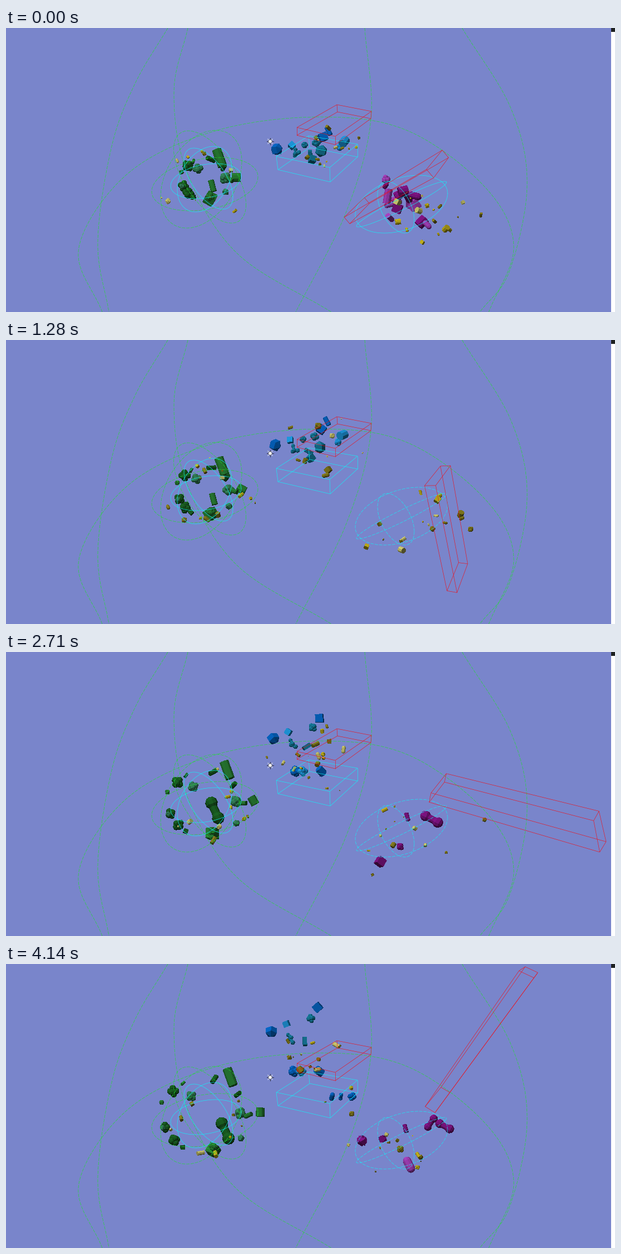
A matplotlib script for the animation above (4190 ms loop, 1095 px wide and 511 px high).

```python
import numpy as np
import matplotlib.pyplot as plt
from matplotlib.animation import FuncAnimation
from matplotlib.collections import LineCollection, PolyCollection
from matplotlib.patches import Circle, Rectangle

W, H, DPI = 1095, 511, 64
PX = 72 / DPI
LOOP, FRAMES = 4190, 88
STEP = LOOP / FRAMES
GREEN, CYAN, RED = "#1fe02f", "#10f2fa", "#ea1420"

COLORS = {
    "green": (36, 112, 46), "dark": (24, 88, 32), "sea": (48, 120, 82),
    "blue": (4, 92, 178), "cyan": (28, 140, 205), "teal": (20, 112, 142),
    "plum": (116, 18, 120), "violet": (150, 58, 170),
    "gold": (176, 160, 26), "olive": (122, 114, 28), "pale": (184, 180, 100),
}
GREENS, BLUES = ["green", "dark", "sea"], ["blue", "cyan", "teal"]
PURPLES, YELLOWS = ["plum", "plum", "violet"], ["gold", "olive", "olive", "pale"]
rng = np.random.default_rng(23)


def ease(u):
    u = np.clip(u, 0, 1)
    return u * u * (3 - 2 * u)


# ---- solids: quads of shape (faces, 4, 3) ----

def lathe(profile, n):
    r, z = np.array(profile, float).T
    a = np.arange(n + 1) * 2 * np.pi / n
    p = np.stack([np.outer(r, np.cos(a)), np.outer(r, np.sin(a)),
                  np.outer(z, np.ones(n + 1))], -1)
    q = np.stack([p[:-1, :-1], p[1:, :-1], p[1:, 1:], p[:-1, 1:]], 2)
    return q.reshape(-1, 4, 3)


def cylinder(r, h, n=10):
    return lathe([(0, -h), (r, -h), (r, h), (0, h)], n)


def arc(r, z, a0, a1, n):
    a = np.radians(np.linspace(a0, a1, n))
    return [(r * np.cos(x), z + r * np.sin(x)) for x in a]


ball = lathe(arc(1, 0, -90, 90, 6), 8)
octa = lathe([(0, -1), (1, 0), (0, 1)], 4)
SOLIDS = {
    "box": cylinder(.95, .65, 4),
    "slab": cylinder(.6, 1, 4),
    "rod": cylinder(.5, 1),
    "drum": cylinder(.75, .75),
    "ico": lathe([(0, -1), (.9, -.45), (.9, .45), (0, 1)], 5),
    "pill": lathe(arc(.48, -.52, -90, 0, 4) + arc(.48, .52, 0, 90, 4), 10),
    "bone": lathe(arc(.42, -.58, -90, 50, 5) + arc(.42, .58, -50, 90, 5), 10),
    "knot": np.concatenate([ball * .5 + s * .5 * d for d in np.eye(3) for s in (-1, 1)]),
    "star": np.concatenate([octa, octa[:, :, [1, 2, 0]] * .75 + .15, cylinder(.8, .6, 4)]),
}
ROUND = ["knot", "drum", "knot", "ico", "rod", "box"]
LIGHT = np.array([-.35, -.65, .68])
bodies = []


def add(path, r, colors, kinds=ROUND, born=-500, gone=LOOP + 500, aim=None):
    """A tumbling solid; path gives its place at a time in ms."""
    bodies.append(dict(
        path=path, r=r, born=born, gone=gone,
        quads=SOLIDS[rng.choice(kinds)],
        color=np.array(COLORS[rng.choice(colors)]) / 255,
        aim=rng.uniform(0, 6.3) if aim is None else np.radians(aim),
        turn=rng.uniform(-.8, .8) if aim is None else 0,
        pitch=rng.uniform(-.9, .9) if aim is None else .2,
        spin=rng.uniform(0, 6.3), rate=rng.uniform(-1.4, 1.4)))


def pose(b, t):
    s = t / 1000
    a, p, c = b["aim"] + b["turn"] * s, b["pitch"], b["spin"] + b["rate"] * s
    d = np.array([np.cos(p) * np.cos(a), np.cos(p) * np.sin(a), np.sin(p)])
    u = np.array([np.sin(a), -np.cos(a), 0])
    v = np.cross(d, u)
    return np.array([u * np.cos(c) + v * np.sin(c),
                     v * np.cos(c) - u * np.sin(c), d])


def shade(b, t):
    size = b["r"] * np.clip(min(t - b["born"], b["gone"] - t) / 150, 0, 1)
    if size < .3:
        return None
    q = b["quads"] @ pose(b, t)
    n = np.cross(q[:, 3] - q[:, 1], q[:, 2] - q[:, 0])
    n /= np.linalg.norm(n, axis=1, keepdims=True) + 1e-9
    order = np.argsort(q[:, :, 2].mean(1))
    order = order[n[order, 2] > 0]
    lit = .42 + .72 * np.clip(n[order] @ LIGHT, 0, 1)
    return (q[order, :, :2] * size + b["path"](t),
            np.clip(lit[:, None] * b["color"], 0, 1))


def slide(a, b, t0=0, t1=LOOP):
    """Straight, even motion from a to b."""
    a, b = np.array(a, float), np.array(b, float)
    return lambda t: a + (b - a) * (t - t0) / (t1 - t0)


# ---- green swarm: spreads out from its centre ----
def spread(x, y):
    mid = np.array([360, 272])
    return lambda t: mid + (np.array([x, y]) - mid) * (1 + .8 * ease(t / LOOP))


for x, y in [(327, 248), (345, 253), (319, 284), (328, 297), (394, 270), (414, 269)]:
    add(spread(x, y), rng.uniform(9, 12), GREENS, ["knot", "drum"])
add(spread(384, 234), 16, ["green"], ["rod"], aim=70)
add(spread(367, 307), 13, ["green"], ["box"])
add(spread(371, 284), 10, ["green"], ["rod"], aim=75, gone=2400)
add(slide((373, 283), (395, 301), 2500), 26, ["dark"], ["bone"], born=2400, aim=66)
for a in np.arange(9) * 2 * np.pi / 9:
    d = rng.uniform(.8, 1.05)
    add(spread(360 + 48 * d * np.cos(a), 272 + 38 * d * np.sin(a)),
        rng.uniform(4, 8), GREENS)


# ---- blue swarm: floats up, the higher the faster ----
def rise(x, y):
    return slide((x, y), (x - 10, y - (318 - y)))


add(rise(487, 219), 11, ["blue"], ["ico"])
add(rise(514, 212), 7, ["cyan"], ["box"])
add(rise(570, 197), 10, ["blue"], ["box"])
for x, y in [(523, 227), (547, 228), (520, 223), (558, 207)]:
    add(rise(x, y), rng.uniform(7, 9), ["teal", "blue"], ["slab", "knot", "bone"])
for x, y in [(537, 211), (567, 222), (551, 237), (580, 186), (600, 215), (608, 205)]:
    add(rise(x, y), rng.uniform(5, 11), BLUES, gone=rng.uniform(1700, 2400))
for x in (527, 540, 573):
    add(rise(x, 255), rng.uniform(8, 11), BLUES, born=rng.uniform(1700, 2400))
for x in (596, 612, 632):
    add(rise(x, 278), 8, ["blue"], ["bone", "pill", "knot"], born=3500)

# ---- purple swarm: swept away, then a second, slow one ----
for i in range(14):
    x, y = 705 + rng.normal(0, 22), 314 + rng.normal(0, 16)
    add(slide((x, y), (x + 10, y + 12), 0, 600), rng.uniform(7, 13), PURPLES,
        ROUND + ["pill", "rod"], gone=rng.uniform(450, 1050))
add(slide((757, 354), (763, 357), 0, 650), 9, ["violet"], ["pill"], gone=1000, aim=45)
add(slide((735, 302), (739, 304), 0, 650), 12, ["plum"], ["pill"], gone=1000, aim=15)
add(slide((780, 296), (765, 301), 2040, 2710), 22, ["plum"], ["bone"], 1750, 2950, 28)
add(slide((798, 291), (788, 292), 3180), 18, ["plum"], ["bone"], 2900, aim=28)
add(slide((760, 281), (764, 286), 3180), 16, ["plum"], ["bone"], 2900, aim=-55)
add(slide((719, 363), (725, 361), 3180), 15, ["violet"], ["pill"], 2900, aim=63)
add(slide((677, 368), (671, 382), 2040, 3000), 10, ["plum"], ["box"], 1750, 3050)
add(slide((702, 348), (712, 351), 2040, 3000), 7, ["plum"], ["knot"], 1750, 3050)
add(slide((723, 297), (718, 296), 2040), 7, ["plum"], ["rod"], 1750, aim=75)
add(slide((640, 325), (640, 317), 3300), 10, ["plum"], ["star"], 3500)
add(slide((677, 322), (677, 314), 3300), 8, ["plum"], ["star"], 3500)


# ---- yellow debris: short-lived bits around each swarm ----
def debris(count, place):
    for born in rng.uniform(-900, LOOP, count):
        x, y = place(np.clip(born / LOOP, 0, 1))
        dx, dy = rng.normal(0, 9, 2)
        r = rng.choice([1.3, 2.5, 4, 5, 6.5])
        add(slide((x, y), (x + dx, y + dy), born, born + 900), r, YELLOWS,
            ["box", "knot", "rod", "drum", "pill"], born, born + rng.uniform(700, 1100))


def near_green(u):
    a, d = rng.uniform(0, 6.3), rng.uniform(.5, 1.1)
    return 358 + 85 * d * np.cos(a), 275 + 60 * d * np.sin(a)


def near_blue(u):
    return rng.normal(585 - 55 * u, 36), rng.normal(210 - 55 * u, 30)


def near_purple(u):
    return rng.normal(775 - 70 * min(2 * u, 1), 52 - 15 * u), rng.normal(333, 30)


debris(65, near_green)
debris(90, near_blue)
debris(85, near_purple)

# ---- stage ----
fig = plt.figure(figsize=(W / DPI, H / DPI), dpi=DPI, facecolor="#7985cb")
ax = fig.add_axes([0, 0, 1, 1])
ax.set_xlim(0, W)
ax.set_ylim(H, 0)
ax.axis("off")
THIN = .65 * PX
DASH = (0, (9, 3))


def line(xy, color, z, style="-"):
    return ax.plot(*np.transpose(xy), color=color, lw=THIN, ls=style, zorder=z)[0]


def curve(*pts):
    """Smooth dashed line through a few points."""
    p = np.array(pts, float)
    m = np.gradient(p, axis=0)
    u = np.linspace(0, 1, 25)[:, None]
    parts = [a + (b - a) * ease(u) + u * (1 - u) * (ma * (1 - u) - mb * u)
             for a, b, ma, mb in zip(p, p[1:], m, m[1:])]
    line(np.concatenate(parts), GREEN, 1, DASH)


def oval(cx, cy, hx, hy, lag, color, style="-"):
    a = np.linspace(0, 2 * np.pi, 160)
    return line(np.stack([cx + hx * np.cos(a), cy + hy * np.cos(a - lag)], 1),
                color, 3, style)


def edges(c):
    """Twelve edges from two rings of four corners."""
    return [(c[i], c[j]) for k in range(4) for i, j in
            [(k, (k + 1) % 4), (k + 4, (k + 1) % 4 + 4), (k, k + 4)]]


def frame_box(corners, color):
    box = LineCollection(edges(np.array(corners)), colors=color,
                         linewidths=THIN, zorder=4)
    ax.add_collection(box)
    return box


def beam_corners(t):
    """Bar turning evenly about a fixed hinge, seen in perspective."""
    a = np.radians(49.2) * (t - 15) / 1000
    hinge = np.array([790, 226.5])
    px, py, side = np.array([[-180.5, 105.5], [140, 169.6], [-24.2, 31.2]])
    out = []
    for far in (0, 1):
        for half, wide in [(-.04, 0), (.04, 0), (.04, 1), (-.04, 1)]:
            x = far * np.cos(a) - half * np.sin(a)
            y = far * np.sin(a) + half * np.cos(a)
            depth = 1 + .271 * x + .01 * y - .12 * wide
            out.append(hinge + (x * px + y * py + wide * side) / depth)
    return np.array(out)


curve((173, 511), (131, 395), (220, 261), (380, 184), (570, 160), (725, 186),
      (862, 287), (913, 393), (868, 511))
curve((291, 0), (232, 100), (190, 213), (165, 385), (185, 511))
curve((820, 0), (908, 145), (937, 282), (905, 438), (852, 511))
curve((327, 0), (302, 115), (325, 258), (415, 405), (585, 511))
curve((645, 0), (656, 165), (612, 330), (521, 511))

oval(357.5, 281, 95.5, 48, 1.85, GREEN, DASH)
oval(351, 272, 73, 88, 1.94, GREEN, DASH)
oval(366.5, 268, 65, 83, .93, GREEN, DASH)
oval(359.5, 275.5, 63.5, 31.5, 1.85, CYAN)
oval(357, 272, 49, 59, 1.9, CYAN)
oval(364, 271, 44, 55, .93, CYAN)
lens = [oval(711, 317, 83, 52, 1.95, CYAN),
        oval(711, 317, 81, 41, 2.86, CYAN),
        oval(701, 322.5, 33, 46.5, 1.07, CYAN)]

frame_box([(486, 231), (544, 194), (632, 209), (582, 251),
           (489, 255), (546, 215), (632, 232), (583, 277)], CYAN)
frame_box([(523, 179), (595, 138), (657, 150), (592, 195),
           (523, 193), (596, 151), (656, 163), (592, 210)], RED)
beam = frame_box(beam_corners(0), RED)

swarm = PolyCollection([], linewidths=0, antialiaseds=False, zorder=2)
ax.add_collection(swarm)

# Lamp
for k, a in enumerate(np.arange(8) * np.pi / 4):
    d = np.array([np.cos(a), np.sin(a)])
    ax.plot(*np.transpose([(475, 204) + 3 * d, (475, 204) + 5.8 * d]),
            color=["#33333f", "#f4f4f4"][k % 2], lw=PX, zorder=5)
ax.add_patch(Circle((475, 204), 3.2, fc="white", ec="#44444c", lw=.8, zorder=6))

ax.add_patch(Rectangle((1087.5, 0), 8, H, fc="white", lw=0, zorder=8))
ax.add_patch(Rectangle((1088, 0), 7, 7, fc="#1c2020", lw=0, zorder=9))


def update(n):
    t = (n + .5) * STEP
    shown = [s for s in (shade(b, t) for b in bodies) if s is not None]
    swarm.set_verts(np.concatenate([s[0] for s in shown]))
    swarm.set_facecolor(np.concatenate([s[1] for s in shown]))
    beam.set_segments(edges(beam_corners(t)))
    for o in lens:
        o.set_linestyle("-" if t < 300 else DASH)
    return [swarm, beam, *lens]


anim = FuncAnimation(fig, update, frames=FRAMES, interval=STEP, repeat=True,
                     repeat_delay=0, blit=False)
plt.show()
```
